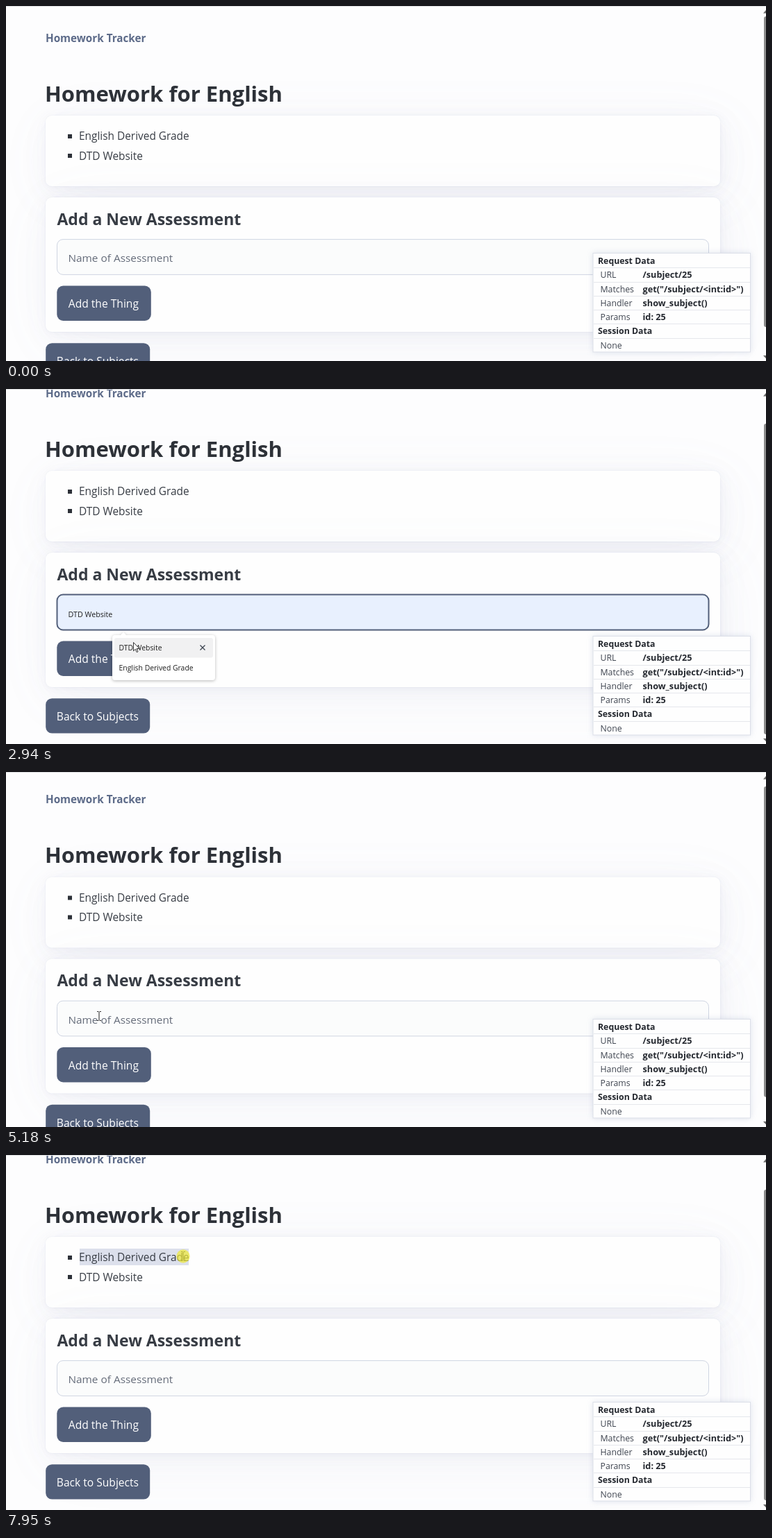
An HTML page for the animation above (8 s loop, 1094x512 px).

```html
<!DOCTYPE html>
<html lang="en">
<head>
<meta charset="utf-8">
<title>Homework Tracker</title>
<style>
  html, body { margin: 0; width: 100%; height: 100%; overflow: hidden; background: #fdfdfe; }
  body { position: relative; font-family: "Open Sans", "Noto Sans", sans-serif; cursor: default; }
  #page, .card, svg { position: absolute; left: 0; top: 0; }
  .card { left: 57px; width: 971px; border-radius: 9px; background: #fefefe; }
  svg { width: 1094px; height: 600px; white-space: pre; }
  .button { fill: #525f7a; }
  .label { font-size: 15.6px; fill: #fff; }
  .body { font-size: 15.4px; fill: #373c44; }
  .bold { font-weight: 700; }
  #field { fill: #fbfcfc; stroke: #cfd5e2; }
  #field.focus { fill: #fefefe; stroke: #525f7a; stroke-width: 2; }
  #field.filled { fill: #e8f0fe; }
  .panel { filter: drop-shadow(0 0 4px rgba(100,118,165,.2)); }
  .menu { filter: drop-shadow(0 1px 2px rgba(0,0,0,.28)); }
  .small { font-size: 12.3px; fill: #3f4550; }
  .strong { font-size: 12.3px; font-weight: 700; fill: #24282f; }
  .code { font-size: 12.7px; }
  .tiny { font-size: 10.4px; font-weight: 500; fill: #1f1f1f; }
</style>
</head>
<body>
<div id="page">
  <div class="card" style="top:158px;height:102px"></div>
  <div class="card" style="top:276px;height:194px"></div>
  <svg>
    <text x="57" y="51.7" class="bold" font-size="15.25" fill="#5d6b89">Homework Tracker</text>
    <text x="56" y="137.5" class="bold pick" font-size="31.05" fill="#2d3138">Homework for English</text>
    <rect id="selection" x="106" y="175" width="157" height="24" fill="#dce0ec"/>
    <path d="M89 185h6v6h-6zM89 213h6v6h-6z" fill="#2d3138"/>
    <text x="105" y="193.3" class="body pick">English Derived Grade</text>
    <text x="105" y="221.5" class="body pick">DTD Website</text>
    <text x="73.5" y="315.6" class="bold pick" font-size="23" fill="#373c44">Add a New Assessment</text>
    <rect id="field" class="pick" x="73.5" y="336.6" width="938" height="50.8" rx="8.5"/>
    <text id="hint" x="89.5" y="369" font-size="15.35" fill="#646b79">Name of Assessment</text>
    <text id="preview" x="89.5" y="369" class="tiny" style="font-size:10.7px">DTD Website</text>
    <rect class="button" x="73.3" y="403.6" width="135.5" height="50.4" rx="9"/>
    <text x="89.8" y="435.3" class="label">Add the Thing</text>
    <rect class="button" x="57.2" y="486.2" width="150" height="50.4" rx="9"/>
    <text x="72.8" y="518" class="label">Back to Subjects</text>
  </svg>
</div>
<svg>
  <path d="M0 .5H1094" stroke="#dfe0e3"/>
  <rect id="thumb" x="1091" y="15" width="8" height="448" rx="3" fill="#8b8b8b"/>
  <path d="M1095 4.5V10.5H1090zM1090 504H1095V509.5z" fill="#6b6b6b"/>
  <g id="panel">
    <rect x="845" y="356.5" width="226.5" height="142.5" fill="#fefefe" stroke="#dcdfe8" class="panel"/>
  </g>
  <g id="menu">
    <path d="M157 355H165L169 350.5 173 355H297Q301 355 301 359V416Q301 420 297 420H157Q153 420 153 416V359Q153 355 157 355Z" fill="#fff" class="menu"/>
    <g id="row">
      <rect x="156" y="359" width="142" height="28.5" rx="3" fill="#f1f1f2"/>
      <path d="M279.5 369.5l7 7m0-7l-7 7" stroke="#3c4450" stroke-width="1.3"/>
    </g>
    <text x="162.5" y="377" class="tiny">DTD Website</text>
    <text x="162.5" y="406" class="tiny">English Derived Grade</text>
  </g>
  <g id="cursor">
    <path id="arrow" d="M.5.5V12.8L3.3 10.2 5.2 14.6 7 13.8 5.1 9.5H9Z" fill="#fff" stroke="#222" stroke-width=".9"/>
    <path id="beam" d="M-3-6.5H-.6M.6-6.5H3M0-6V6M-3 6.5H-.6M.6 6.5H3" stroke="#333" fill="none" stroke-width="1.1"/>
    <circle id="press" r="9.7" fill="#f0e936" fill-opacity=".7"/>
  </g>
</svg>
<script>
const LOOP = 8000, STEP = 70, DEPTH = 40;
const CLICK = { field: 2150, away: 3480, text: 7950 };
const $ = id => document.getElementById(id);
const show = (id, on) => { $(id).style.display = on ? "" : "none"; };
const within = (v, a, b) => v >= a && v < b;

// Each move curves from where the last one ended; without a bend it is straight
const moves = [
  { from: 200, until: 410, to: [534, 301] },
  { from: 940, until: 1080, to: [404, 277] },
  { from: 1740, until: 2530, to: [183, 365], bend: [108, 330] },
  { from: 3010, until: 3340, to: [84, 252] },
  { from: 3410, until: 3820, to: [77, 253], bend: [20, 251] },
  { from: 4360, until: 4980, to: [134, 352], bend: [355, 66] },
  { from: 5460, until: 5740, to: [60, 240], bend: [60, 500] },
  { from: 5800, until: 6210, to: [200, 132], bend: [580, -36] },
  { from: 6280, until: 6680, to: [268, 147] },
  { from: 7350, until: 7610, to: [268, 147], bend: [254, 143] },
  { from: 7810, until: 7880, to: [255, 146] }
];

// Wheel turns switch between top and bottom, pausing one step on the way
const turns = [{ at: 1340, mid: 22 }, { at: 4020, mid: 18 }, { at: 5180, mid: 6.5 }];

function pointerAt(t) {
  let pos = [1060, 540];
  for (const { from, until, to, bend } of moves) {
    if (t < from) break;
    const gaps = Math.round((until - from) / STEP);
    const step = Math.min(gaps, Math.floor((t - from) / (until - from) * gaps + 1e-6));
    const u = (step + 1) / (gaps + 1), v = 1 - u;
    pos = pos.map((a, k) => {
      const mid = bend ? bend[k] : (a + to[k]) / 2;
      return v * v * a + 2 * u * v * mid + u * u * to[k];
    });
  }
  return pos;
}

function scrollAt(t) {
  return turns.reduce((s, { at, mid }, i) =>
    t < at ? s : t < at + STEP ? mid : i % 2 ? 0 : DEPTH, 0);
}

// Soft shadow: each layer doubles the blur
function cardShadow() {
  return Array.from({ length: 6 }, (_, i) => {
    const blur = 2.8 * 2 ** i;
    return `${blur / 12}px ${blur / 6}px ${blur}px rgba(129,145,181,${.018 + .008 * i})`;
  }).join() + ",0 0 0 1px rgba(129,145,181,.03)";
}

function buildPanel() {
  const rows = [
    ["Request Data"], ["URL", "/subject/25"], ["Matches", 'get("/subject/<int:id>")'],
    ["Handler", "show_subject()"], ["Params", "id: 25"], ["Session Data"], ["None", ""]
  ];
  const add = (tag, attrs, text = "") => {
    const el = document.createElementNS($("panel").namespaceURI, tag);
    for (const k in attrs) el.setAttribute(k, attrs[k]);
    el.textContent = text;
    $("panel").append(el);
  };
  rows.forEach(([key, value], i) => {
    const y = 372 + i * 20.25, isHead = value === undefined;
    if (i) add("path", { d: `M846 ${Math.round(y - 15) + .5}H1071`, stroke: "#e5e7ec" });
    add("text", { x: isHead ? 852 : 855.5, y, class: isHead ? "strong" : "small" }, key);
    if (value) add("text", { x: 916.5, y, class: "strong code" }, value);
  });
}

function draw(t) {
  const scroll = scrollAt(t);
  const [x, y] = pointerAt(t);
  const focus = within(t, CLICK.field, CLICK.away);
  const menu = focus && t >= CLICK.field + 2 * STEP;
  const hover = menu && within(x, 153, 301) && within(y, 356, 388);
  const overText = !hover && picks.some(b =>
    within(x, b.x, b.x + b.width) && within(y + scroll, b.y, b.y + b.height));

  $("page").style.transform = `translateY(${-scroll}px)`;
  $("thumb").setAttribute("y", 15 + scroll * .875);
  $("field").setAttribute("class", (focus ? "focus" : "") + (hover ? " filled" : ""));
  show("preview", hover);
  show("hint", !hover);
  show("menu", menu);
  show("row", hover);
  show("selection", t >= 6950);
  show("press", Object.values(CLICK).some(at => within(t, at, at + 2 * STEP)));
  show("beam", overText);
  show("arrow", !overText);
  $("cursor").setAttribute("transform", `translate(${x} ${y})`);
}

buildPanel();
document.querySelectorAll(".card").forEach(card => { card.style.boxShadow = cardShadow(); });
const picks = [...document.querySelectorAll(".pick")].map(el => el.getBBox());
const begin = performance.now();
function tick() {
  draw((performance.now() - begin) % LOOP);
  requestAnimationFrame(tick);
}
tick();
</script>
</body>
</html>
```
